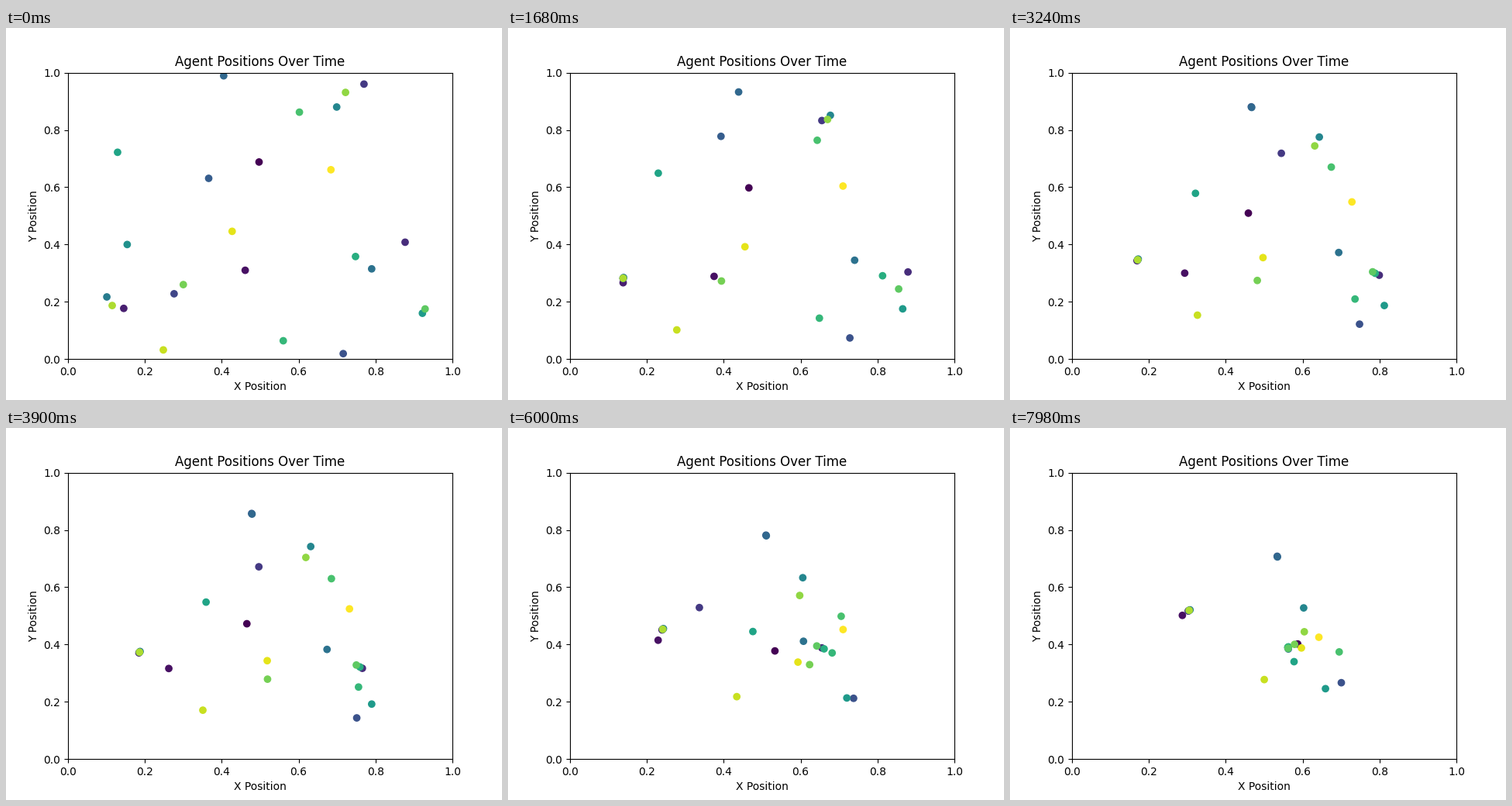
Animation, 640 px wide and 480 px high, one loop 8 s. Source, as a matplotlib script:

```python
import numpy as np
import matplotlib.pyplot as plt
from matplotlib.animation import FuncAnimation

LOOP_MS = 8000
STEPS = 134

# Initial conditions, one agent per entry: start x, start y,
# speed (axis lengths per 1000 steps), index of the agent it pursues
AGENTS = np.array([
    (.497, .688, 3.42, 19), (.461, .310, 3.19, 5), (.145, .177, 3.22, 12),
    (.877, .408, 3.76, 18), (.770, .960, 6.12, 21), (.276, .228, 6.90, 10),
    (.716, .019, 2.01, 15), (.366, .631, 5.33, 8), (.405, .989, 2.35, 13),
    (.790, .315, 2.07, 14), (.101, .217, 2.78, 7), (.699, .880, 3.20, 20),
    (.154, .400, 4.72, 10), (.922, .160, 2.09, 1), (.129, .722, 4.44, 13),
    (.748, .358, 3.34, 18), (.560, .064, 4.25, 3), (.602, .862, 3.80, 13),
    (.929, .175, 3.63, 9), (.300, .260, 3.39, 15), (.722, .931, 3.85, 23),
    (.115, .187, 3.88, 10), (.248, .032, 2.73, 19), (.427, .446, 2.18, 16),
    (.684, .661, 2.24, 18),
])


def pursue(pos, speed, target):
    """Move every agent straight at its target, stopping if it gets there."""
    gap = pos[target] - pos
    dist = np.linalg.norm(gap, axis=1)
    share = np.minimum(speed, dist) / np.maximum(dist, 1e-9)
    return pos + gap * share[:, None]


def simulate(steps):
    path = [AGENTS[:, :2]]
    speed = AGENTS[:, 2] / 1000
    target = AGENTS[:, 3].astype(int)
    while len(path) < steps:
        path.append(pursue(path[-1], speed, target))
    return path


path = simulate(STEPS)

fig, ax = plt.subplots(figsize=(6.4, 4.8), dpi=100)
ax.set(xlim=(0, 1), ylim=(0, 1), title="Agent Positions Over Time",
       xlabel="X Position", ylabel="Y Position")
dots = ax.scatter(*path[0].T, c=np.arange(len(AGENTS)), cmap="viridis")


def update(i):
    dots.set_offsets(path[i])
    return (dots,)


anim = FuncAnimation(fig, update, frames=STEPS, interval=LOOP_MS / STEPS,
                     repeat=True, repeat_delay=0)
plt.show()
```
